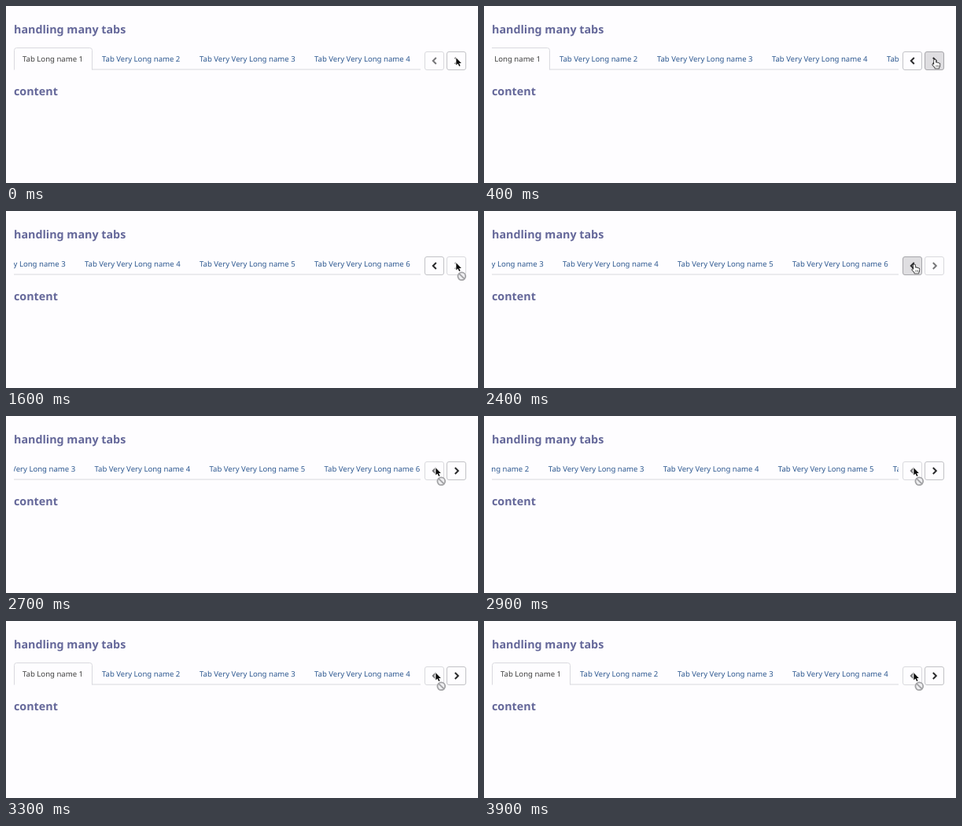
An HTML page with a canvas that plays this animation: 600 by 226 pixels, repeating every 4 s.

```html
<!DOCTYPE html>
<html lang="en">
<head>
<meta charset="utf-8">
<title>Handling many tabs</title>
<style>
  html, body { margin: 0; width: 100%; height: 100%; overflow: hidden; background: #fefdff; }
  canvas { display: block; width: 600px; height: 226px; }
</style>
</head>
<body>
<canvas id="stage"></canvas>
<script>
const W = 600, H = 226, LOOP = 4000;
const BG = '#fefdff', LINE = '#d9d9de';
const MAX_SCROLL = 292;
const TABS = [
  ['Tab Long name 1', 21],
  ['Tab Very Long name 2', 122],
  ['Tab Very Very Long name 3', 246],
  ['Tab Very Very Long name 4', 392],
  ['Tab Very Very Long name 5', 538],
  ['Tab Very Very Long name 6', 684]
];
const VIEW = { left: 10, right: 527, base: 81 };
const PREV = 544.5, NEXT = 572.5;

const canvas = document.getElementById('stage');
const ctx = canvas.getContext('2d');
const dpr = window.devicePixelRatio || 1;
canvas.width = W * dpr;
canvas.height = H * dpr;

const clamp = v => Math.min(1, Math.max(0, v));
const progress = (t, from, to) => clamp((t - from) / (to - from));
const easeInOut = p => p < 0.5 ? 2 * p * p : 1 - 2 * (1 - p) * (1 - p);

function scrollAt(t) {
  return MAX_SCROLL * (easeInOut(progress(t, 270, 890)) - easeInOut(progress(t, 2610, 3232)));
}

function text(str, x, y, font, color) {
  ctx.font = font;
  ctx.fillStyle = color;
  ctx.fillText(str, x, y);
}

function heading(str, y) {
  text(str, 10, y, 'bold 14.3px "Noto Sans", "Open Sans", sans-serif', '#65689a');
}

function drawTabs(scroll) {
  const { left, right, base } = VIEW;
  ctx.save();
  ctx.beginPath();
  ctx.rect(left, 50, right - left, 33);
  ctx.clip();
  ctx.fillStyle = LINE;
  ctx.fillRect(left, base - 0.5, right - left, 1);

  // Active tab, open at the bottom
  ctx.translate(-scroll, 0);
  ctx.fillStyle = BG;
  ctx.fillRect(10, 54, 99.5, 28);
  ctx.beginPath();
  ctx.moveTo(10.5, base + 0.5);
  ctx.arcTo(10.5, 53.5, 60, 53.5, 3);
  ctx.arcTo(109.5, 53.5, 109.5, base, 3);
  ctx.lineTo(109.5, base + 0.5);
  ctx.strokeStyle = LINE;
  ctx.lineWidth = 1;
  ctx.stroke();

  TABS.forEach(([label, x], i) =>
    text(label, x, 71.2, '500 9.58px "Noto Sans", "Open Sans", sans-serif', i ? '#2d5890' : '#404040'));
  ctx.restore();
}

function drawButton(cx, dir, { disabled, fill }) {
  ctx.beginPath();
  ctx.roundRect(cx - 12, 58.5, 24, 23, 2.5);
  ctx.fillStyle = fill || BG;
  ctx.fill();
  ctx.lineWidth = 1;
  ctx.strokeStyle = fill ? '#a6a6aa' : disabled ? '#d9d9dd' : '#c2c2c6';
  ctx.stroke();

  const x = cx + 0.3;
  ctx.beginPath();
  ctx.moveTo(x - 2 * dir, 66);
  ctx.lineTo(x + 2 * dir, 70);
  ctx.lineTo(x - 2 * dir, 74);
  ctx.lineWidth = 2;
  ctx.strokeStyle = disabled ? '#77777a' : '#2b2b2d';
  ctx.stroke();
}

function outlined(path, fill, stroke, width) {
  ctx.lineJoin = 'round';
  ctx.lineWidth = width;
  ctx.strokeStyle = stroke;
  ctx.stroke(path);
  ctx.fillStyle = fill;
  ctx.fill(path);
}

const ARROW = new Path2D('M0 0V10.6L2.5 8.3L4.4 12.4L6.1 11.6L4.3 7.7H7.6Z');
const HAND = new Path2D('M-1.2 2Q-1.2 .9 0 .9T1.2 2V5.2Q2.4 4.5 3.3 5.6Q4.5 5 5.3 6.2' +
  'Q7 5.9 7.1 7.4Q7.3 10 6 11.6V13.4H.2V12Q-1.8 10.2-3.4 8.3Q-3.5 6.6-1.2 8Z');

function drawBadge() {
  ctx.beginPath();
  ctx.arc(7, 17, 4.9, 0, 2 * Math.PI);
  ctx.fillStyle = '#eeeef0';
  ctx.fill();
  ctx.moveTo(3.6, 13.6);
  ctx.lineTo(10.4, 20.4);
  ctx.lineWidth = 1.8;
  ctx.strokeStyle = '#a2a2a5';
  ctx.stroke();
}

function drawCursor(x, kind) {
  ctx.save();
  ctx.translate(x, 66.3);
  if (kind === 'hand') {
    ctx.translate(0.9, 1.5);
    ctx.scale(0.88, 0.88);
    outlined(HAND, '#fff', '#222', 1.7);
    ctx.beginPath();
    for (const fx of [1.8, 3.4, 5]) {
      ctx.moveTo(fx, 8.6);
      ctx.lineTo(fx, 11.4);
    }
    ctx.lineWidth = 0.6;
    ctx.strokeStyle = '#333';
    ctx.stroke();
  } else {
    if (kind === 'blocked') drawBadge();
    ctx.scale(0.86, 0.86);
    outlined(ARROW, '#0c0c0c', '#fff', 2.2);
  }
  ctx.restore();
}

function cursorAt(t) {
  const x = 572.3 - 26 * easeInOut(progress(t, 1720, 2200));
  let kind = 'arrow';
  if (t >= 100 && t < 1300) kind = 'hand';
  else if (t >= 1300 && x > 560) kind = 'blocked';
  else if (t >= 1300 && x < 557) kind = t < 2600 ? 'hand' : 'blocked';
  return { x, kind };
}

function draw(t) {
  const cursor = cursorAt(t);
  const hovering = cursor.kind === 'hand';
  const atNext = cursor.x > 558;
  const pressed = t < 1300 || t >= 2400;
  const hoverFill = hovering ? (pressed ? '#dfdee1' : '#ebeaed') : null;

  ctx.setTransform(dpr, 0, 0, dpr, 0, 0);
  ctx.fillStyle = BG;
  ctx.fillRect(0, 0, W, H);
  ctx.textRendering = 'geometricPrecision';

  heading('handling many tabs', 35);
  heading('content', 113.5);
  drawTabs(scrollAt(t));
  drawButton(PREV, -1, { disabled: t < 270 || t >= 2600, fill: atNext ? null : hoverFill });
  drawButton(NEXT, 1, { disabled: t >= 1300 && t < 2600, fill: atNext ? hoverFill : null });
  drawCursor(cursor.x, cursor.kind);
}

function tick() {
  draw(performance.now() % LOOP);
  requestAnimationFrame(tick);
}
tick();
</script>
</body>
</html>
```
